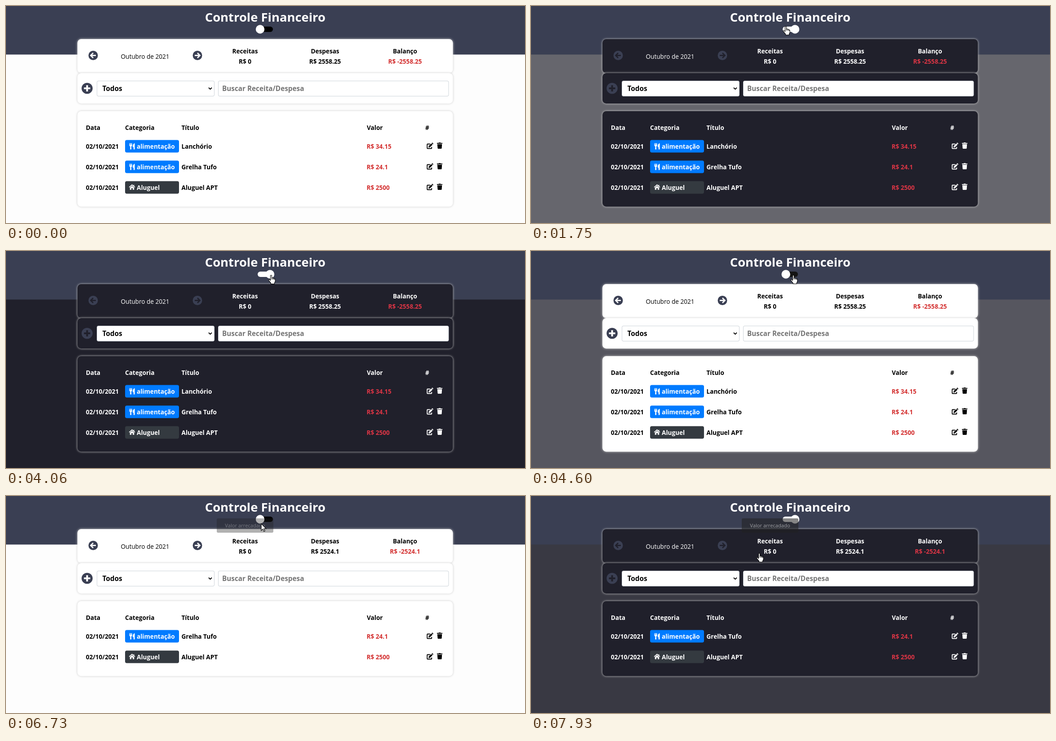
Animation of 1155x485 px, one loop 7990 ms. Source, as an HTML page with a canvas:

```html
<!DOCTYPE html>
<html lang="pt-BR">
<head>
<meta charset="utf-8">
<title>Controle Financeiro</title>
<style>
  html, body { margin: 0; width: 100%; height: 100%; overflow: hidden; background: #fdfdfd; }
  canvas { display: block; }
</style>
</head>
<body>
<canvas id="stage" width="1155" height="485"></canvas>
<script>
const ctx = document.getElementById('stage').getContext('2d');
const LOOP = 7990;
const FONT = '"Open Sans", sans-serif';
const NAVY = '#3a3f53';
const DELETE_AT = 5860;

const LIGHT = { panel: '#ffffff', ink: '#000000', red: '#d32f2f' };
const DARK = { panel: '#20202b', ink: '#ffffff', red: '#dc3545' };

// theme switches: knob start, page start, page fade length, dark or not
const SWITCHES = [
  { knob: 1350, page: 1350, fade: 1000, dark: 1 },
  { knob: 4435, page: 4512, fade: 500, dark: 0 },
  { knob: 7330, page: 7330, fade: 1000, dark: 1 }
];

const ROWS = [
  { food: true, title: 'Lanchório', value: '34.15' },
  { food: true, title: 'Grelha Tufo', value: '24.1' },
  { food: false, title: 'Aluguel APT', value: '2500' }
];

const STATS = [
  { label: 'Receitas', tip: 'Valor arrecadado' },
  { label: 'Despesas', tip: 'Valor Gasto' },
  { label: 'Balanço', tip: 'Diferença de receitas e despesas' }
];
const statX = i => 532 + 178 * i;

// pointer moves: start, end, x, y reached
const ENTRY = { t: 150, x: 1049, y: 476 };
const MOVES = [
  [150, 870, 575, 55], [950, 1480, 567, 45], [1750, 2350, 560, 100],
  [2490, 2700, 734, 107], [2890, 3120, 905, 107], [3390, 4060, 590, 54],
  [4190, 4600, 584, 54], [4600, 4920, 556, 62], [4990, 5730, 956, 312],
  [5880, 6530, 545, 92], [6600, 6920, 574, 54], [7330, 7460, 551, 69],
  [7460, 7650, 530, 82], [7720, 7850, 508, 128]
];

const ICON = {
  trash: new Path2D('M0 1H3.7L4.2 0H8L8.5 1H12.2V2.8H0zM.9 3.7H11.3L10.6 12.8Q10.5 14 9.3 14H2.9Q1.7 14 1.6 12.8z'),
  box: new Path2D('M7.5 3H1.7Q1 3 1 3.7V12.3Q1 13 1.7 13H10.3Q11 13 11 12.3V9.5'),
  pencil: new Path2D('M4.4 7.6L10.2 1.8L12.8 4.4L7 10.2L4.1 10.5zM10.9 1.1L11.8 .2Q12.6 -.2 13.2 .3L14.3 1.4Q14.8 2 14.3 2.8L13.5 3.7z'),
  cutlery: new Path2D('M.4 0H1.6V4H2.4V0H3.8V4H4.6V0H5.8L6.3 4.6Q6.3 7 4.3 7.8L4.6 14H1.7L2 7.8Q0 7 0 4.6zM12 0V14H9.4V9H7.4Q7 2 12 0z'),
  roof: new Path2D('M.6 7.6L7 2.2L13.4 7.6'),
  house: new Path2D('M2.2 8.6L7 4.6L11.8 8.6V13.2H8.4V9.6H5.6V13.2H2.2zM10.2 2.2H11.8V5.4L10.2 4.2z'),
  arrow: new Path2D('M0 0V15.4L3.6 12L5.9 17.4L8.2 16.4L6 11.2H10.8z'),
  hand: new Path2D('M-1.5 1.5Q-1.5 0 0 0T1.5 1.5V6.3Q2 5.6 3.3 5.9T4.5 7.2Q5.3 6.6 6.3 6.9T7.3 8.3Q8 7.8 8.6 8.3T9.2 9.8V13Q9.2 15 7.5 17V19.5H-.5V17.5L-5.4 11.6Q-6.2 10.3 -5.2 9.6T-1.5 11.6z'),
  knuckles: new Path2D('M1.5 6.5V9.8M4.5 7.3V10M7.3 8.4V10.5')
};

const clamp = v => Math.max(0, Math.min(1, v));
const mix = (a, b, k) => a + (b - a) * k;
const easeOut = k => 1 - (1 - k) ** 3;

// the CSS "ease" curve
function ease(x) {
  x = clamp(x);
  let lo = 0, hi = 1, s = x;
  for (let i = 0; i < 20; i++) {
    s = (lo + hi) / 2;
    const at = 0.75 * s * (1 - s) + s * s * s;
    if (at < x) lo = s; else hi = s;
  }
  return 0.3 * s * (1 - s) * (1 - s) + 3 * s * s * (1 - s) + s * s * s;
}

function themeAt(t) {
  let dark = 0, knob = 0, page = 0;
  for (const s of SWITCHES) {
    if (t >= s.knob) knob = mix(1 - s.dark, s.dark, ease((t - s.knob) / 250));
    if (t >= s.page) {
      dark = s.dark;
      page = mix(1 - s.dark, s.dark, ease((t - s.page) / s.fade));
    }
  }
  return { knob, page, skin: dark ? DARK : LIGHT };
}

function pointerAt(t) {
  let { x, y } = ENTRY;
  for (const [from, to, mx, my] of MOVES) {
    const k = easeOut(clamp((t - from) / (to - from)));
    x = mix(x, mx, k);
    y = mix(y, my, k);
  }
  return { x, y };
}

const inside = (p, l, t, r, b) => p.x >= l && p.x <= r && p.y >= t && p.y <= b;
const overStat = (p, i) => inside(p, statX(i) - 88, 90, statX(i) + 88, 136);

// tips wait 100 ms, then fade over 200 ms of hovering
function tipAlpha(t, i) {
  let held = 0;
  for (let ago = 0; ago < 300; ago += 10) {
    if (overStat(pointerAt(t - ago), i)) held += 10;
  }
  return clamp((held - 100) / 200);
}

function text(str, x, y, color, size = 13.6, align = 'left', weight = 'bold') {
  ctx.font = `${weight} ${size}px ${FONT}`;
  ctx.textAlign = align;
  ctx.fillStyle = color;
  ctx.fillText(str, x, y);
}

function rounded(x, y, w, h, r, color) {
  ctx.beginPath();
  ctx.roundRect(x, y, w, h, r);
  ctx.fillStyle = color;
  ctx.fill();
}

function disc(x, y, r, color) {
  ctx.beginPath();
  ctx.arc(x, y, r, 0, Math.PI * 2);
  ctx.fillStyle = color;
  ctx.fill();
}

function line(color, width, ...pts) {
  ctx.beginPath();
  for (let i = 0; i < pts.length; i += 2) ctx.lineTo(pts[i], pts[i + 1]);
  ctx.strokeStyle = color;
  ctx.lineWidth = width;
  ctx.stroke();
}

function icon(x, y, color, fill, outline) {
  ctx.save();
  ctx.translate(x, y);
  ctx.fillStyle = ctx.strokeStyle = color;
  ctx.lineWidth = 1.8;
  ctx.fill(fill);
  if (outline) ctx.stroke(outline);
  ctx.restore();
}

function panel(y, h, color) {
  ctx.save();
  ctx.shadowColor = '#cccccc';
  ctx.shadowBlur = 5;
  rounded(159, y, 835.5, h, 8.5, color);
  ctx.restore();
}

function field(x, w) {
  rounded(x, 167, w, 35, 4, '#ced4da');
  rounded(x + 1, 168, w - 2, 33, 3, '#ffffff');
}

function roundArrow(x, dir, skin) {
  disc(x, 110.5, 10.5, NAVY);
  line(skin.panel, 2.8, x - 6 * dir, 110.5, x + 5 * dir, 110.5);
  line(skin.panel, 2.8, x, 105, x + 5.5 * dir, 110.5, x, 116);
}

function drawHeader(knob) {
  ctx.fillStyle = NAVY;
  ctx.fillRect(0, 0, 1155, 108.5);
  text('Controle Financeiro', 576.8, 35, '#ffffff', 27.4, 'center');
  const v = Math.round(255 * knob);
  rounded(560, 46, 34, 12, 6, `rgb(${v},${v},${v})`);
  disc(mix(565.5, 587.5, knob), 52, 9.7, '#ffffff');
}

function drawSummary(skin, cut) {
  panel(74, 76, skin.panel);
  roundArrow(194, -1, skin);
  roundArrow(426, 1, skin);
  text('Outubro de 2021', 309.5, 117.5, skin.ink, 13.6, 'center', 'normal');
  const spent = cut ? '2524.1' : '2558.25';
  const sums = ['R$ 0', 'R$ ' + spent, 'R$ -' + spent];
  STATS.forEach((s, i) => {
    text(s.label, statX(i), 105.5, skin.ink, 13.6, 'center');
    text(sums[i], statX(i), 128.5, i === 2 ? skin.red : skin.ink, 13.6, 'center');
  });
}

function drawSearch(skin) {
  panel(150, 68, skin.panel);
  disc(180.5, 184, 12.3, NAVY);
  line(skin.panel, 4, 173.5, 184, 187.5, 184);
  line(skin.panel, 4, 180.5, 177, 180.5, 191);
  field(202, 262);
  field(472, 513.5);
  text('Todos', 214.5, 190, '#000000', 15.3);
  line('#000000', 1.8, 451, 182.5, 454.5, 186, 458, 182.5);
  text('Buscar Receita/Despesa', 481, 190, '#757575', 15.3);
}

function drawRow(row, y, skin) {
  text('02/10/2021', 177.7, y + 5, skin.ink);
  rounded(265, y - 14, 120, 28, 4, row.food ? '#007bff' : '#343a40');
  if (row.food) icon(274.5, y - 7, '#ffffff', ICON.cutlery);
  else icon(273.5, y - 8, '#ffffff', ICON.house, ICON.roof);
  text(row.food ? 'alimentação' : 'Aluguel', 291, y + 5, '#ffffff');
  text(row.title, 390.5, y + 5, skin.ink);
  text('R$ ' + row.value, 802.5, y + 5, skin.red);
  icon(936.3, y - 8, skin.ink, ICON.pencil, ICON.box);
  icon(959, y - 8.5, skin.ink, ICON.trash);
}

function drawTable(skin, cut) {
  const rows = cut ? ROWS.slice(1) : ROWS;
  panel(235, 75.5 + 46 * rows.length, skin.panel);
  const heads = { Data: 177.7, Categoria: 265, 'Título': 390.5, Valor: 803, '#': 933 };
  for (const h in heads) text(h, heads[h], 276.5, skin.ink);
  rows.forEach((r, i) => drawRow(r, 313.5 + 46 * i, skin));
}

function drawTips(t) {
  STATS.forEach(({ tip }, i) => {
    const alpha = tipAlpha(t, i);
    if (!alpha) return;
    ctx.save();
    ctx.globalAlpha = alpha;
    ctx.font = `500 11.2px ${FONT}`;
    const w = ctx.measureText(tip).width + 36.6;
    rounded(statX(i) - w / 2, 50, w, 32, 3, '#222222');
    text(tip, statX(i), 70, '#ffffff', 11.2, 'center', '500');
    ctx.restore();
  });
}

function drawPointer(t) {
  if (t < ENTRY.t) return;
  const p = pointerAt(t);
  const hand = inside(p, 557, 42, 598, 61) || inside(p, 934, 300, 975, 324) ||
    STATS.some((s, i) => overStat(p, i));
  const shape = hand ? ICON.hand : ICON.arrow;
  ctx.save();
  ctx.translate(p.x, p.y);
  ctx.fillStyle = '#ffffff';
  ctx.strokeStyle = '#000000';
  ctx.lineWidth = 1.1;
  ctx.fill(shape);
  ctx.stroke(shape);
  if (hand) ctx.stroke(ICON.knuckles);
  ctx.restore();
}

function draw(t) {
  const { knob, page, skin } = themeAt(t);
  const cut = t >= DELETE_AT;
  const tone = Math.round(mix(253, 32, page));
  ctx.fillStyle = `rgb(${tone},${tone},${Math.round(mix(253, 43, page))})`;
  ctx.fillRect(0, 0, 1155, 485);
  drawHeader(knob);
  drawSummary(skin, cut);
  drawSearch(skin);
  drawTable(skin, cut);
  drawTips(t);
  drawPointer(t);
}

const start = performance.now();
function tick() {
  draw((performance.now() - start) % LOOP);
  requestAnimationFrame(tick);
}
tick();
</script>
</body>
</html>
```
